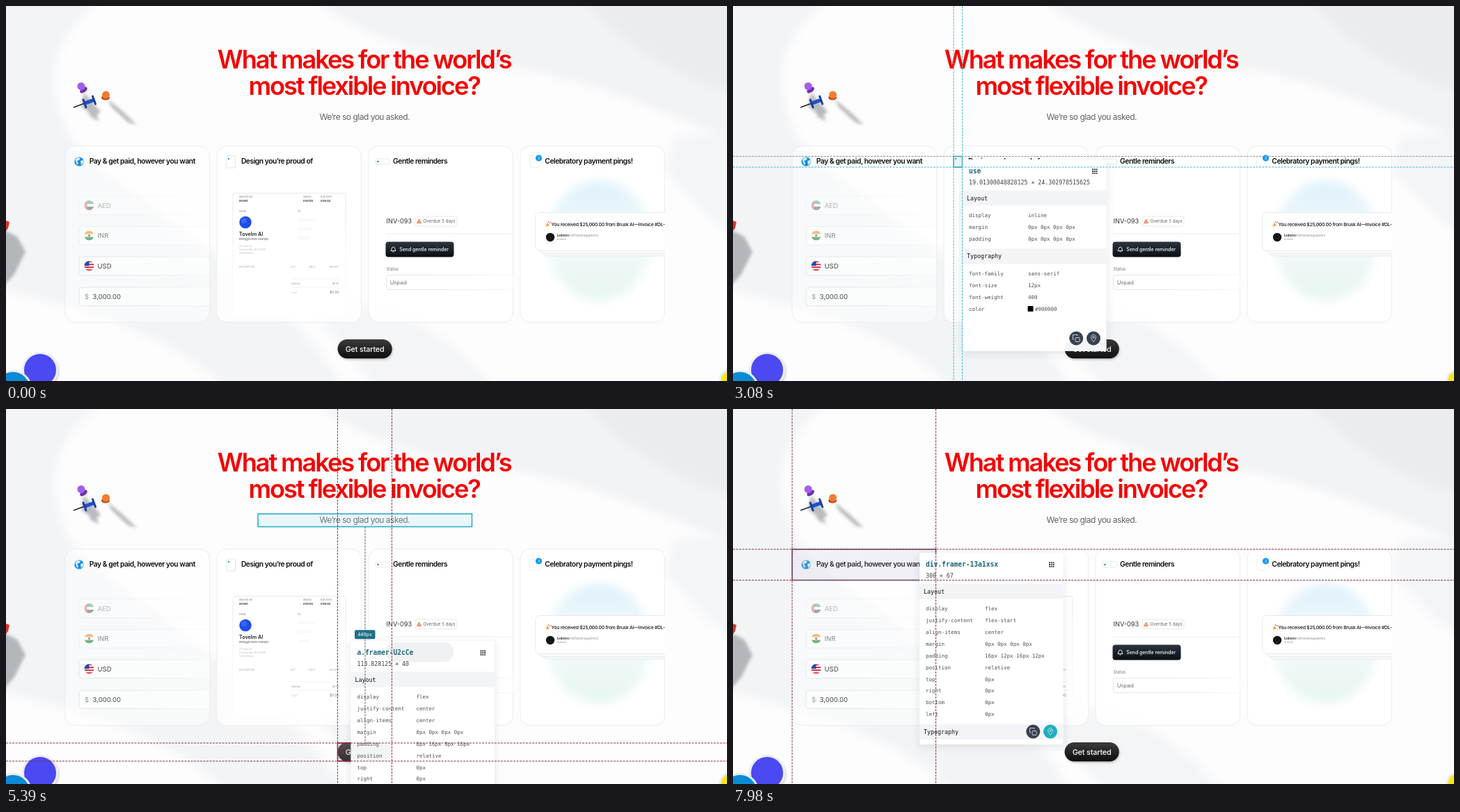
An HTML page that plays this animation: 1036 px wide and 540 px high, repeating every 8000 ms.

```html
<!DOCTYPE html>
<html lang="en">
<head>
<meta charset="utf-8">
<title>Inspecting an invoice page</title>
<style>
html, body { margin: 0; width: 100%; height: 100%; overflow: hidden; background: #fbfcfd; }
svg { display: block; }
text { font-family: Inter, "Liberation Sans", sans-serif; white-space: pre; }
.mono text { font-family: "DejaVu Sans Mono", monospace; }
.heading { font-size: 36.2px; font-weight: 600; letter-spacing: -.058em; fill: #f50000; text-anchor: middle; }
.title { font-size: 10.3px; font-weight: 600; letter-spacing: -.046em; fill: #111; }
.field { fill: #fff; fill-opacity: .5; stroke: url(#fade); }
.dash { stroke-dasharray: 3 1.5; stroke-width: 1; }
</style>
</head>
<body>
<svg id="stage" width="1036" height="540" viewBox="0 0 1036 540">
  <defs>
    <filter id="soft" x="-20%" y="-20%" width="140%" height="140%"><feGaussianBlur stdDeviation="7"/></filter>
    <filter id="blur2" x="-50%" y="-50%" width="200%" height="200%"><feGaussianBlur stdDeviation="2"/></filter>
    <filter id="lift" x="-20%" y="-20%" width="140%" height="150%"><feDropShadow dx="0" dy="3" stdDeviation="6" flood-color="#345" flood-opacity=".13"/></filter>
    <filter id="near" x="-20%" y="-20%" width="140%" height="160%"><feDropShadow dx="1" dy="2" stdDeviation="1.5" flood-opacity=".2"/></filter>
    <linearGradient id="dark" x2="0" y2="1"><stop stop-color="#3b3b3c"/><stop offset="1" stop-color="#0e0e0f"/></linearGradient>
    <linearGradient id="navy" x2="0" y2="1"><stop stop-color="#2b3540"/><stop offset="1" stop-color="#0a0e13"/></linearGradient>
    <linearGradient id="halo" x2="0" y2="1"><stop stop-color="#def1fb"/><stop offset=".5" stop-color="#f3fafc"/><stop offset="1" stop-color="#e6f6ef"/></linearGradient>
    <linearGradient id="fade" x1="0" x2="1"><stop offset=".4" stop-color="#e5e6e9"/><stop offset="1" stop-color="#e5e6e9" stop-opacity=".2"/></linearGradient>
    <linearGradient id="fadeDown" x2="0" y2="1"><stop stop-color="#e8e9ec"/><stop offset="1" stop-color="#e8e9ec" stop-opacity="0"/></linearGradient>
    <clipPath id="disc"><circle r="7"/></clipPath>
    <clipPath id="lastCard"><rect x="739" y="201" width="208" height="254" rx="14"/></clipPath>
  </defs>

  <rect width="1036" height="540" fill="#fdfdfe"/>
  <g filter="url(#soft)">
    <path d="M-20-20H150C60 50 50 110 100 200C180 285 420 410 490 560H320C260 480 120 440-20 405Z" fill="#f2f4f6"/>
    <path d="M430-20H1060V195C960 165 880 120 760 95C640 75 520 60 430-20Z" fill="#f1f3f5"/>
    <path d="M820-20H1060V130C980 110 880 60 820-20Z" fill="#eaedf0"/>
    <path d="M960 185H1060V330C1020 330 980 270 945 235Z" fill="#f3f5f7"/>
    <path d="M440 425C570 425 650 480 710 560H540C500 510 460 470 440 425Z" fill="#f3f5f7"/>
  </g>

  <!-- pins and stickers -->
  <g filter="url(#blur2)" fill="#777b80" opacity=".5">
    <path d="M112 124L136 152L128 160L108 145ZM146 134L168 152L188 171L176 168L152 146ZM116 146L128 152L134 166L122 160Z"/>
    <path d="M-4 322L16 332L28 354L12 386L-4 404Z"/>
  </g>
  <path d="M97 146L112 140.500" stroke="#223" stroke-width="1.4"/>
  <ellipse cx="111.500" cy="121" rx="6" ry="3.500" fill="#6d32ad" transform="rotate(-35 111.500 121)"/><circle cx="108" cy="115.500" r="5.500" fill="#a35ee8"/>
  <path d="M112 140.500L126 135.500" stroke="#1f52c8" stroke-width="5.500"/>
  <path d="M111 135L115 146M124.500 130L128.500 141" stroke="#173f9f" stroke-width="3" stroke-linecap="round"/>
  <ellipse cx="143" cy="132" rx="6" ry="3.500" fill="#b84912"/><circle cx="143.500" cy="128" r="5.500" fill="#f47b32"/>
  <path d="M0 309L5 311L3 320L0 324Z" fill="#dc3526"/>
  <g stroke="#eceef3" stroke-width="3">
    <circle cx="49" cy="524" r="24.500" fill="#4b48f2" filter="url(#near)"/>
    <circle cx="10" cy="551" r="25.500" fill="#098ad6" filter="url(#near)"/>
    <circle cx="1041" cy="539" r="15" fill="#f7e71a"/>
  </g>

  <text class="heading" x="514.700" y="89.500">What makes for the world’s</text>
  <text class="heading" x="514.700" y="128">most flexible invoice?</text>
  <text x="515.300" y="164" text-anchor="middle" font-size="12" letter-spacing="-.5" fill="#606266">We’re so glad you asked.</text>

  <g id="page"></g>
  <g id="boxes"></g>
  <g id="popup" class="mono" filter="url(#lift)"></g>
  <g id="guides" class="mono"></g>
</svg>
<script>
const $ = id => document.getElementById(id);
const text = (x, y, size, fill, str, extra = '') =>
  `<text x="${x}" y="${y}" font-size="${size}" fill="${fill}" ${extra}>${str}</text>`;
const rect = (x, y, w, h, fill, extra = '') =>
  `<rect x="${x}" y="${y}" width="${w}" height="${h}" fill="${fill}" ${extra}/>`;
const line = (x1, y1, x2, y2, stroke, extra = '') =>
  `<path d="M${x1} ${y1}L${x2} ${y2}" stroke="${stroke}" fill="none" ${extra}/>`;
const dot = (x, y, r, fill) => `<circle cx="${x}" cy="${y}" r="${r}" fill="${fill}"/>`;
// A form field that runs open into the right edge of its card.
const field = (x, y, right, h) =>
  `<path class="field" d="M${right} ${y}H${x + 4}Q${x} ${y} ${x} ${y + 4}V${y + h - 4}Q${x} ${y + h} ${x + 4} ${y + h}H${right}"/>`;
const bold = 'font-weight="bold"', medium = 'font-weight="500"';

// ---------- static page ----------
const flags = {
  AED: rect(-7, -7, 14, 5, '#1b8a4b') + rect(-7, -2, 14, 4, '#fff') + rect(-7, 2, 14, 5, '#222') + rect(-7, -7, 4, 14, '#e0343c'),
  INR: rect(-7, -7, 14, 5, '#f79a35') + rect(-7, -2, 14, 4, '#fff') + rect(-7, 2, 14, 5, '#2a8a3c') + dot(0, 0, 1.5, '#3b4fa0'),
  USD: rect(-7, -7, 14, 14, '#fff') + [-7, -3, 1, 5].map(y => rect(-7, y, 14, 2, '#d6303d')).join('') + rect(-7, -7, 7, 7, '#2b4aa8')
};

function currencyCard() {
  const rows = Object.keys(flags).map((code, i) => {
    const y = 274 + i * 43.6;
    return `<g opacity="${[.38, .62, 1][i]}">${field(105, y, 292, 26.5)}
      <g transform="translate(119.500 ${y + 13})" clip-path="url(#disc)">${flags[code]}</g>
      ${text(131.5, y + 16.7, 9.5, '#444', code)}</g>`;
  });
  return rows.join('') + field(105, 405, 292, 26.5) +
    text(113, 421.5, 9.6, '#999', '$') + text(124.5, 421.5, 9.5, '#444', '3,000.00');
}

function invoiceCard() {
  const tiny = (x, y, str, fill = '#777', extra = '') => text(x, y, 3.3, fill, str, extra);
  return rect(326, 269.5, 162, 176, '#fff', 'rx="3" stroke="url(#fadeDown)"') +
    tiny(335, 276, 'INVOICE NO') + tiny(427, 276, 'ISSUED') + tiny(452, 276, 'DUE DATE') +
    tiny(335, 282, '000001', '#222', bold) + tiny(427, 282, '01/01/24', '#222', bold) + tiny(452, 282, '01/15/24', '#222', bold) +
    tiny(335, 297, 'FROM') + tiny(419, 297, 'TO') +
    dot(344, 311.5, 8.7, '#1d4dea') + dot(342, 309, 4, '#3767f5') +
    text(335, 331, 7.2, '#222', 'Tovelm AI', 'font-weight="600"') + text(335, 337.3, 3.8, '#555', 'billing@tovelm.example') +
    ['27 Tavrin St', 'Ostmere Bay, NV 00000', 'United States'].map((s, i) => tiny(335, 346.5 + i * 5.3, s, '#b5b7bb')).join('') +
    [0, 1, 2].map(i => rect(419, 306 + i * 13, 26 - i * 4, 4, '#f9f9fa')).join('') +
    tiny(335, 377, 'DESCRIPTION', '#aaa') + tiny(409, 377, 'QTY', '#aaa') + tiny(435, 377, 'PRICE', '#aaa') + tiny(464, 377, 'AMOUNT', '#aaa') +
    line(410, 393, 480, 393, '#f4f4f6') + line(410, 405, 480, 405, '#f4f4f6') +
    tiny(410, 400.5, 'Subtotal', '#999') + tiny(469, 400.5, '$0.00', '#888') +
    tiny(410, 413.5, 'Total', '#bbb') + text(465, 414, 4.8, '#777', '$0.00');
}

function reminderCard() {
  return text(546.5, 313, 9.2, '#333', 'INV-093') +
    rect(588, 303, 60, 14, '#fff', 'rx="3" stroke="#e8e9eb"') +
    '<path d="M593.500 307L596.500 312.500H590.500Z" fill="#f8a47c" stroke="#e9602c" stroke-width=".7"/>' +
    text(599.5, 312.3, 6.2, '#666', 'Overdue 5 days') +
    line(546, 328, 729, 328.01, '#eeeff1') +
    rect(545.5, 339.5, 98, 22, 'url(#navy)', 'rx="4"') +
    '<path d="M553 352.500C554.500 351 553.500 347 556.500 347S558.500 351 560 352.500ZM555.500 354H557.500" fill="none" stroke="#fff" stroke-width=".9"/>' +
    text(565.3, 353, 6.9, '#fff', 'Send gentle reminder', medium) +
    text(546.5, 381, 5.9, '#777', 'Status') +
    field(546.5, 387.5, 729, 21) + text(552, 400.5, 7.1, '#666', 'Unpaid');
}

function pingCard() {
  return `<ellipse cx="852" cy="338" rx="75" ry="86" fill="url(#halo)" filter="url(#soft)"/>` +
    rect(771, 309, 220, 51, '#f7f8f9', 'rx="6" stroke="#e8eaec"') +
    rect(766, 303, 220, 53.5, '#fafafb', 'rx="6" stroke="#e8eaec"') +
    rect(760.5, 297.5, 220, 55, '#fff', 'rx="6" stroke="#e8eaec"') +
    '<path d="M775.500 318L777.500 312L781 316Z" fill="#f2a93b"/><path d="M779 312L780 310M781 313L783 311" stroke="#d8434e"/>' +
    text(783.5, 317, 6.8, '#111', 'You received $25,000.00 from Brusk AI—Invoice #DL-0042', medium + ' letter-spacing="-.25"') +
    dot(782, 333, 6.2, '#151515') +
    text(792, 331.7, 4.2, '#222', 'Ledvoro', bold) + text(809, 331.7, 4.1, '#888', 'notifications@ledvoro') +
    text(792, 337.2, 3.6, '#777', 'to me ▾');
}

function cardHeads() {
  const titles = ['Pay &amp; get paid, however you want', 'Design you’re proud of', 'Gentle reminders', 'Celebratory payment pings!'];
  return titles.map((s, i) => `<text class="title" x="${119.7 + i * 218.2}" y="227.300">${s}</text>`).join('') +
    dot(105, 224, 6.6, '#158fe2') +
    '<path d="M99.500 221L103 218L107 219L105 222L102 223L104 227L102 229ZM107 223L111 222V226L108 229Z" fill="#d9f0f4"/>' +
    rect(316.5, 216, 13, 17, '#fff', 'rx="1" stroke="#e3e5e8"') + dot(320, 220, 1.2, '#3394e8') +
    rect(531.5, 220, 20, 8, '#fff', 'rx="1.5" stroke="#e6e8ea"') + dot(534.5, 224, 1.2, '#1a6fd0') +
    rect(752.5, 215, 17, 17, '#fff', 'rx="4" stroke="#eff0f1"') + dot(765.5, 219, 4.6, '#1799ea') +
    text(765.5, 221, 5, '#fff', '3', 'text-anchor="middle"');
}

$('page').innerHTML =
  [85, 303, 521, 739].map((x, i) => rect(x, 201.5, 207.5, 254, '#fff', `rx="14" fill-opacity="${i ? .85 : .45}" stroke="#ecedf0"`)).join('') +
  currencyCard() + invoiceCard() + reminderCard() + `<g clip-path="url(#lastCard)">${pingCard()}</g>` + cardHeads() +
  rect(476.5, 480, 78.3, 27.5, 'url(#dark)', 'rx="13.700" filter="url(#near)"') +
  text(515.6, 497.8, 10.8, '#fff', 'Get started', 'text-anchor="middle" letter-spacing="-.15" ' + medium);

// ---------- inspector ----------
const flexRows = (justify, padding) => [
  ['display', 'flex'], ['justify-content', justify], ['align-items', 'center'],
  ['margin', '0px 0px 0px 0px'], ['padding', padding], ['position', 'relative'],
  ...['top', 'right', 'bottom', 'left'].map(side => [side, '0px'])];
const none = '0px 0px 0px 0px';
const item = (name, size, box, rows = flexRows('center', none), type = []) => ({ name, size, box, rows, type });

const items = {
  intro: item('div.framer-1bcijli', '630 × 184', [298.5, 50.5, 434, 126]),
  cards: item('div.framer-t9ft9y', '1815 × 375', [-3, 199.3, 1042, 258]),
  card: item('div.framer-1f4k8wz', '300 × 369', [303, 202, 207, 253]),
  head: item('div.framer-13a1xsx', '300 × 67', [85, 202, 206.5, 44.5], flexRows('flex-start', '16px 12px 16px 12px')),
  head2: item('div.framer-1q0m7ce', '300 × 67', [303, 202, 207, 44.5], flexRows('flex-start', '16px 12px 16px 12px')),
  icon: item('use', '19.01300048828125 × 24.302978515625', [317, 216.5, 12.5, 15.5],
    [['display', 'inline'], ['margin', none], ['padding', none]],
    [['font-family', 'sans-serif'], ['font-size', '12px'], ['font-weight', '400'], ['color', '#000000']]),
  button: item('a.framer-U2cCe', '113.828125 × 40', [476.5, 481, 78, 26], flexRows('center', '8px 16px 8px 16px')),
  note: item('p.framer-text', '446 × 27', [362, 151, 307.5, 18.5])
};

// [start, inspected item, measured item, distance]
const scenes = [
  [0], [2310, 'intro'], [2520, 'cards'], [2660, 'head2'], [2800, 'icon'],
  [3220, 'head2'], [3360, 'card'], [4060, 'cards'], [4340, 'button'],
  [5180, 'button', 'cards', '34px'], [5320, 'button', 'note', '449px'], [5460, 'button', 'intro', '441px'],
  [6790, 'intro'], [6930, 'cards'], [7210, 'head']];
const path = [
  [2310, 385, 171], [2870, 332, 222], [3010, 332, 222], [3080, 330, 221], [3220, 330, 221],
  [3640, 425, 300], [3850, 425, 300], [4480, 497, 334], [4620, 497, 334], [4690, 495.5, 334],
  [6720, 495.5, 334], [6790, 440, 130], [7140, 269.5, 199.5], [7350, 268, 207], [8000, 268, 207]];
const pins = [[4970, 6790], [7840, 8000]];

function popupAt(t) {
  const i = Math.max(1, path.findIndex(p => p[0] >= t));
  const [a, b] = [path[i - 1], path[i]];
  const u = (t - a[0]) / (b[0] - a[0]), k = u * u * (3 - 2 * u);
  return [a[1] + (b[1] - a[1]) * k, a[2] + (b[2] - a[2]) * k];
}

const mix = (a, b, k) => `rgb(${a.map((v, i) => Math.round(v + (b[i] - v) * k))})`;
const teal = [45, 176, 199], wine = [134, 36, 58];
const tealTint = [155, 216, 230], wineTint = [215, 165, 190];

function drawPopup([x, y], { name, size, rows, type }, hotPin) {
  let out = rect(0, 0, 206.5, 276, '#fff', 'rx="3"') +
    rect(546 - x, 336 - y, 97, 28, '#f0f1f2', 'rx="13"') + rect(477 - x, 481 - y, 77, 26, '#f3f4f5', 'rx="13"');
  let mid = 55.5;
  const section = (label, list) => {
    out += rect(0, mid - 11, 206.5, 22, '#f3f4f7') + text(6, mid + 3, 8.3, '#111', label);
    mid += 24.8;
    for (const [key, value] of list) {
      const swatch = key === 'color';
      if (swatch) out += rect(93.5, mid - 4, 8, 8, '#000', 'rx="1"');
      out += text(9, mid + 2.6, 7.5, '#4b5059', key) + text(swatch ? 104 : 94, mid + 2.6, 7.5, '#4b5059', value);
      mid += 16.94;
    }
    mid += 8.3;
  };
  out += text(9, 20.3, 9.6, '#1d6477', name, bold) + text(9, 36.3, 8.25, '#3c4047', size);
  for (let i = 0; i < 9; i++) out += rect(186 + i % 3 * 2.8, 13.3 + Math.floor(i / 3) * 2.8, 1.9, 1.9, '#333');
  section('Layout', rows);
  section('Typography', type);
  out += dot(163.2, 257.5, 10, '#374350') + dot(188, 257.5, 10, hotPin ? '#1cafc3' : '#374350') +
    `<g fill="none" stroke="#d5dae0" stroke-width=".9">${rect(162, 256.5, 6, 6, 'none', 'rx="1"')}
    <path d="M160 259H158.500V252.500H165V254M188 262.500C183 257 184 252.500 188 252.500S193 257 188 262.500Z"/><circle cx="188" cy="256" r="1.300"/></g>`;
  return `<svg x="${x}" y="${y}" width="206.500" height="276">${out}</svg>`;
}

function drawBox([x, y, w, h], stroke, tint) {
  return rect(x, y, w, h, tint, `fill-opacity=".2" stroke="${stroke}" stroke-width="1.600"`);
}

function drawGuides([x, y, w, h], color, grayRows) {
  const gray = '#8b9498', cls = 'class="dash"';
  return line(x, 0, x, 540, color, cls) + line(x + w, 0, x + w, 540, color, cls) +
    line(0, y, 1036, y, grayRows > 0 ? gray : color, cls) + line(0, y + h, 1036, y + h, grayRows > 1 ? gray : color, cls);
}

function drawMeasure([x, y, w, h], label) {
  const top = y + h, mid = (top + 481) / 2;
  return line(516, top, 516, 481, '#59636b', 'class="dash"') + rect(501, mid - 7, 29.5, 13, '#1f6f85', 'rx="2"') +
    text(515.7, mid + 2, 7, '#fff', label, 'text-anchor="middle"');
}

function render(t) {
  const [, key, measured, distance] = scenes.filter(s => s[0] <= t).pop();
  if (!key) {
    for (const id of ['boxes', 'popup', 'guides']) $(id).innerHTML = '';
    return;
  }
  const target = items[key], pin = pins.find(p => t >= p[0] && t < p[1]);
  const k = pin ? Math.min(1, (t - pin[0] + 40) / 320) : 0;
  $('boxes').innerHTML = drawBox(target.box, mix(teal, wine, k), mix(tealTint, wineTint, k)) +
    (measured ? drawBox(items[measured].box, mix(teal, wine, 0), mix(tealTint, wineTint, 0)) : '');
  $('popup').innerHTML = drawPopup(popupAt(t), target, t >= 7560);
  $('guides').innerHTML = drawGuides(target.box, pin ? '#8b3148' : '#4bb9cc', { intro: 2, icon: 1 }[key] || 0) +
    (measured ? drawMeasure(items[measured].box, distance) : '');
}

// The screen advances in 70 ms steps.
let shown = -1;
function tick(now) {
  const t = Math.floor(now % 8000 / 70) * 70;
  if (t !== shown) render(shown = t);
  requestAnimationFrame(tick);
}
render(0);
requestAnimationFrame(tick);
</script>
</body>
</html>
```
